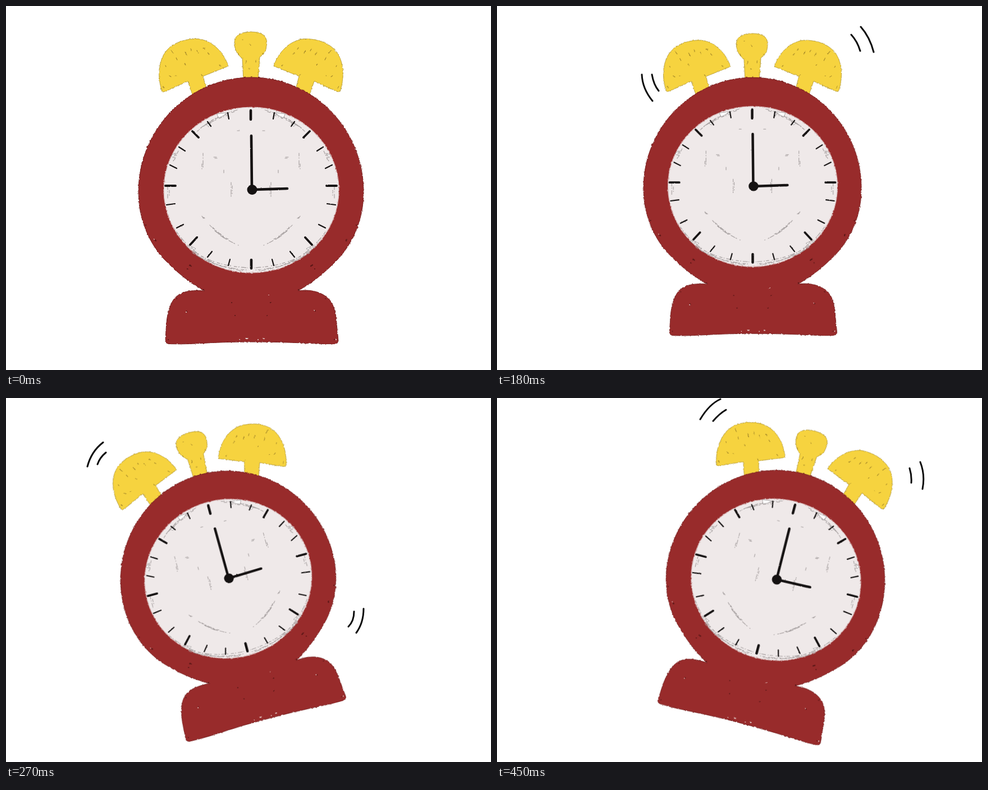
An HTML page without scripts for the animation above (540 ms loop, 864 px wide and 648 px high).

```html
<!DOCTYPE html>
<html lang="en">
<head>
<meta charset="utf-8">
<title>Ringing alarm clock</title>
<style>
  html, body { margin: 0; width: 100%; height: 100%; overflow: hidden; background: #fff; }
  svg { display: block; width: 100vw; height: 100vh; }
  path { fill: none; stroke-linecap: round; stroke-linejoin: round; }

  .red { fill: #982b2b; stroke: #762020; stroke-width: 1; }
  .yellow { fill: #f6d33f; stroke: #a88d2b; stroke-width: .8; }
  .ink { stroke: #151212; }
  .smudge { stroke: #a39d9d; stroke-width: 1.1; stroke-dasharray: 5 3 1 4 8 2 2 6; }
  .chip { fill: #fff; stroke: #948e8e; stroke-width: .8; }
  .fleck { stroke: #a08427; stroke-width: 1.1; }
  .pit { stroke: #5c1717; stroke-width: 2.2; }
  .pinhole { stroke: #e9d9d5; stroke-width: 1.8; }
  .lines path { stroke: #0c0c0c; stroke-width: 3; }

  .clock, .lines { animation: 540ms step-end infinite; }
  .clock { animation-name: shake; }
  .lines { opacity: 0; }
  .right { animation-name: right; }
  .middle { animation-name: middle; }
  .left { animation-name: left; }

  @keyframes shake {
    0%, 100% { transform: none; }
    16.66%, 83.33% { transform: translate(498px, 323.2px) rotate(14.75deg) scale(.972) translate(-438px, -327px); }
    33.33%, 66.66% { transform: translate(32.5px, 4.3px) scale(.968); }
    50% { transform: translate(396.7px, 321px) rotate(-14.9deg) scale(.957) translate(-438px, -327px); }
  }
  @keyframes right { 0%, 33.33%, 100% { opacity: 0; } 16.66%, 83.33% { opacity: 1; } }
  @keyframes middle { 0%, 50%, 83.33%, 100% { opacity: 0; } 33.33%, 66.66% { opacity: 1; } }
  @keyframes left { 0%, 66.66%, 100% { opacity: 0; } 50% { opacity: 1; } }
</style>
</head>
<body>
<svg viewBox="0 0 864 648">
  <defs>
    <filter id="rough" filterUnits="userSpaceOnUse" x="220" y="30" width="434" height="590" color-interpolation-filters="sRGB">
      <feTurbulence type="fractalNoise" baseFrequency=".28" numOctaves="2" seed="4"/>
      <feDisplacementMap in="SourceGraphic" scale="3" xChannelSelector="R" yChannelSelector="G"/>
    </filter>
    <filter id="fine" filterUnits="userSpaceOnUse" x="270" y="170" width="334" height="316" color-interpolation-filters="sRGB">
      <feTurbulence type="fractalNoise" baseFrequency=".4" numOctaves="2" seed="7"/>
      <feDisplacementMap in="SourceGraphic" scale="1.8" xChannelSelector="R" yChannelSelector="G"/>
    </filter>

    <g id="bell">
      <path class="yellow" d="M277.500 151C271 129 270 107 281 86.500C293 66 318 58 342 58.500C368 61 389 84 396 107L351 125L358 152L333 160L324 134L284 152Q280 154 277.500 151Z"/>
      <path class="fleck" d="M294 79l4 5M303 92l2 4M319 82l3 5M329 76l2 4M340 79l2 5M352 74l2 3M359 83l3 3M291 124l3 2M302 124h1M280 143l2 3M380 105l2 2M348 122l2 2M284 106l1 2M318 103l2 2"/>
    </g>

    <g id="half">
      <path class="smudge" d="M341 223Q368 197 412 185M347 217Q372 198 408 188M352 214Q372 202 394 195M303 262L298 276M307 258L300 274M288 322V342M291 328V340M304 402Q330 440 376 460M322 428Q362 462 430 466M332 439Q372 466 430 470M340 444Q380 467 428 472"/>
      <path class="smudge" d="M351 262V292M349 281V291M370 269H377M372 271H376M401 314V342M403 320V334M349 374L353 380M351 376L354 378M363 390Q382 412 414 426M368 394Q386 411 396 415M372 400Q386 413 396 417M388 292V300M412 222H416"/>
      <path class="chip" d="M376 192L394 190L386 196L379 199ZM357 211L365 208L361 214ZM295 266L301 262L298 270ZM330 428L338 432L335 434Z"/>
      <path class="ink" stroke-width="2.2" d="M395 190L397 201M359 206L365 214M308 251L319 258M292 283L304 289M286 354L301 352M304 395L316 389M359 447L367 437M396 462L399 451"/>
      <path class="ink" stroke-width="3.8" d="M332 223L343 234M284 320H302M328 425L340 412"/>
    </g>

    <path id="pits" class="pit" d="M322 543h.1M304 521h.1M327 461l3 2M323 468h.1M266 416l1 2M352 505h.1M408 551h.1M402 528h.1M289 594h.1M249 390h.1"/>
  </defs>

  <g class="clock">
    <g filter="url(#rough)">
      <use href="#bell"/>
      <use href="#bell" transform="matrix(-1 0 0 1 873 0)"/>
      <path class="yellow" d="M407 70Q406 58 412 53Q420 46 436 46Q453 46 460 53Q466 60 464 72Q463 84 452 91L449 132H423L421 93Q409 85 407 70Z"/>
      <path class="fleck" d="M413 84l2 3M457 84l1 2M434 68l2 2M428 97v4M445 96v4M421 60h1M433 112h1"/>

      <path class="red" d="M437 127C548 127 637 219 637 331C637 385 614 426 592 450C567 476 545 493 520 507C549 503 569 513 578 525C589 541 588 560 591 585L592 596Q591 602 580 601.500C545 602 520 598 437 598C355 598 340 603 291 601.500Q283 601 284 594C286 566 285 546 297 525C307 509 325 505 354 507C328 493 306 476 281 450C259 426 236 385 236 331C236 219 326 127 437 127Z"/>
      <use href="#pits"/>
      <use href="#pits" transform="matrix(-1 0 0 1 873 0)"/>
      <path class="pinhole" d="M416 594h.1M428 592h2M449 594h.1M458 592h2M321 545h.1M549 542h.1M468 515h.1M264 415h.1M588 594h.1"/>
      <ellipse cx="437" cy="327.500" rx="156" ry="147.500" fill="#efe9e9" stroke="#d5b3b3" stroke-width="1.2"/>
    </g>

    <g filter="url(#fine)">
      <use href="#half"/>
      <use href="#half" transform="matrix(-1 0 0 1 873 0)"/>
      <path class="ink" stroke-width="4.6" d="M436 186V202M437 452V467M437 231L438 327L501 325"/>
      <circle cx="438.500" cy="327" r="9" fill="#151212"/>
    </g>
  </g>

  <g class="lines right">
    <path d="M362 38Q378 11 398 2M385 41Q396 28 408 21M735 125Q739 138 738 151M754 114Q763 137 758 162"/>
  </g>
  <g class="lines middle">
    <path d="M258 122Q259 147 277 169M276 122Q279 140 288 151M631 51Q642 63 647 80M648 37Q664 55 671 82"/>
  </g>
  <g class="lines left">
    <path d="M145 122Q152 95 173 79M163 118Q167 106 178 97M620 380Q620 397 610 407M637 375Q637 400 624 418"/>
  </g>
</svg>
</body>
</html>
```
